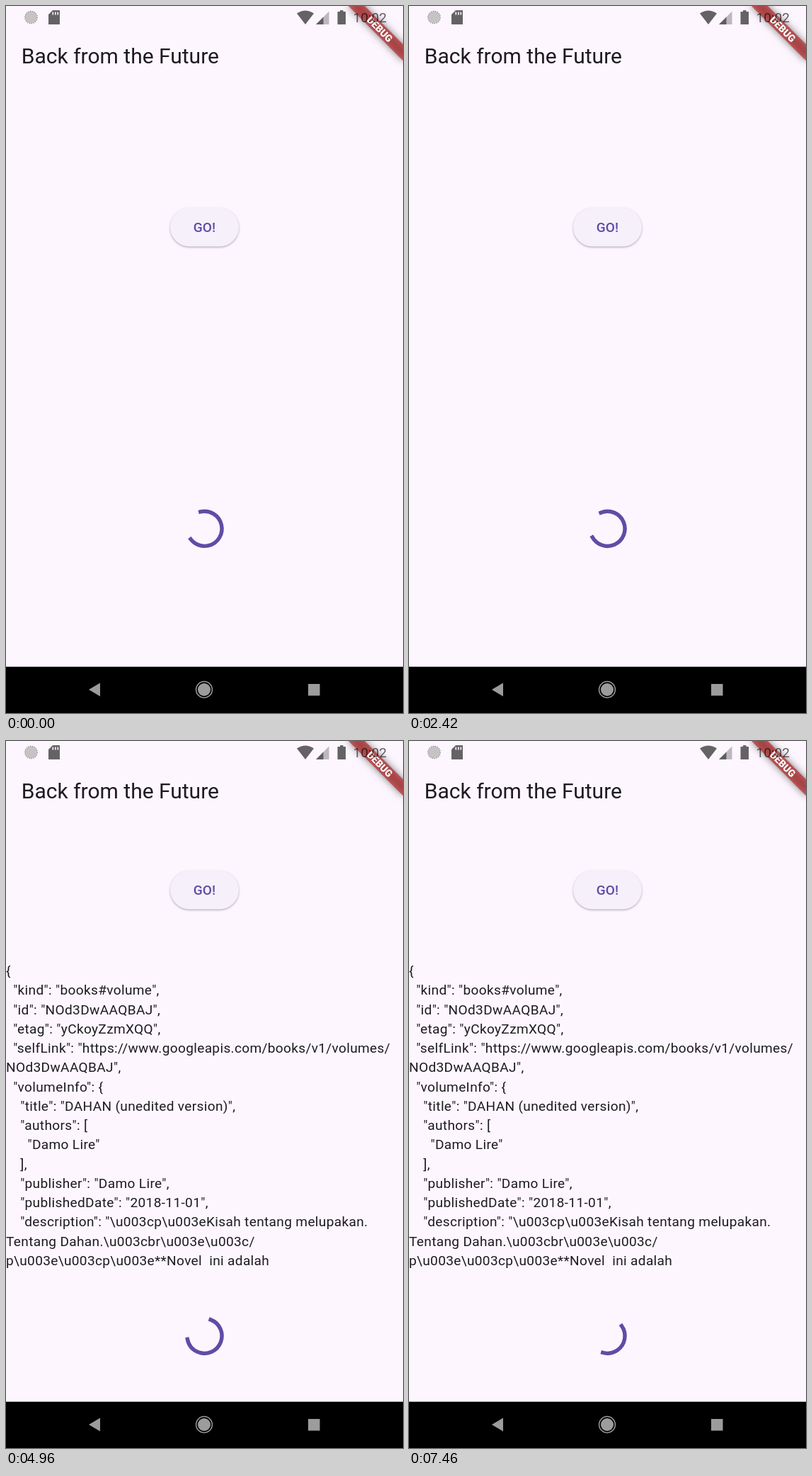
Recreate the animation shown at these times as an HTML page with a canvas. Size 561 by 998 pixels, loop 7.5 s.

```html
<!DOCTYPE html>
<html lang="en">
<head>
<meta charset="utf-8">
<title>Back from the Future</title>
<style>
  html, body { margin: 0; width: 100%; height: 100%; overflow: hidden; background: #fdf6fe; }
  body { position: relative; font-family: Roboto, "Noto Sans", sans-serif; color: #1d1b20; }
  canvas { position: absolute; left: 0; top: 0; display: block; }
  .label { position: absolute; margin: 0; white-space: pre; font-family: inherit; }
  #title { left: 21.8px; top: 51px; font-size: 30px; line-height: 39px; }
  #clock { left: 490.5px; top: 4px; font-size: 19px; line-height: 26px; color: rgba(0, 0, 0, .62); }
  #go { left: 232px; width: 97px; font-size: 19.09px; font-weight: 500; line-height: 27.27px;
        letter-spacing: .14px; text-align: center; color: #604ca6; }
  #json { left: 0; top: 311px; font-size: 19.09px; line-height: 27.27px; letter-spacing: .34px; }
</style>
</head>
<body>
<canvas id="stage" width="561" height="998"></canvas>
<div class="label" id="title">Back from the Future</div>
<div class="label" id="clock">10:02</div>
<div class="label" id="go">GO!</div>
<pre class="label" id="json"></pre>
<script>
const W = 561, H = 998, LOOP = 7500, FPS = 24;
const S = 1.3636;               // device pixels per logical pixel
const RESPONSE = 3700;          // when the answer appears
const PRIMARY = '#604ca6', ICON = 'rgba(0,0,0,.6)', BG = '#fdf6fe';
const ctx = document.getElementById('stage').getContext('2d');
const goLabel = document.getElementById('go');
const json = document.getElementById('json');

json.textContent = String.raw`{
  "kind": "books#volume",
  "id": "NOd3DwAAQBAJ",
  "etag": "yCkoyZzmXQQ",
  "selfLink": "https://www.googleapis.com/books/v1/volumes/
NOd3DwAAQBAJ",
  "volumeInfo": {
    "title": "DAHAN (unedited version)",
    "authors": [
      "Damo Lire"
    ],
    "publisher": "Damo Lire",
    "publishedDate": "2018-11-01",
    "description": "\u003cp\u003eKisah tentang melupakan.
Tentang Dahan.\u003cbr\u003e\u003c/
p\u003e\u003cp\u003e**Novel  ini adalah`;

const clamp = x => Math.min(1, Math.max(0, x));

function poly(color, ...pts) {
  ctx.fillStyle = color;
  ctx.beginPath();
  for (let i = 0; i < pts.length; i += 2) ctx.lineTo(pts[i], pts[i + 1]);
  ctx.fill();
}

function rect(color, x, y, w, h) {
  ctx.fillStyle = color;
  ctx.fillRect(x, y, w, h);
}

function disc(color, x, y, r) {
  ctx.fillStyle = color;
  ctx.beginPath();
  ctx.arc(x, y, r, 0, 2 * Math.PI);
  ctx.fill();
}

function ring(color, x, y, r, width) {
  ctx.strokeStyle = color;
  ctx.lineWidth = width;
  ctx.beginPath();
  ctx.arc(x, y, r, 0, 2 * Math.PI);
  ctx.stroke();
}

// cubic-bezier(.4, 0, .2, 1)
function fastOutSlowIn(x) {
  let lo = 0, hi = 1, s = .5;
  for (let i = 0; i < 24; i++) {
    s = (lo + hi) / 2;
    const bx = 1.2 * (1 - s) ** 2 * s + .6 * (1 - s) * s * s + s ** 3;
    if (bx < x) lo = s; else hi = s;
  }
  return s * s * (3 - 2 * s);
}

function spinner(cy, ms) {
  const u = ms / 1333 % 1, turn = ms / 2222 % 1;
  const head = fastOutSlowIn(clamp(u * 2));
  const tail = fastOutSlowIn(clamp(u * 2 - 1));
  const start = Math.PI * (-.5 + 1.5 * tail + 2 * turn + .5 * u);
  const sweep = Math.max(1.5 * Math.PI * (head - tail), .001);
  ctx.strokeStyle = PRIMARY;
  ctx.lineWidth = 4 * S;
  ctx.lineCap = 'square';
  ctx.beginPath();
  ctx.arc(280.5, cy, 18 * S, start, start + sweep);
  ctx.stroke();
  ctx.lineCap = 'butt';
}

function button(cy, press) {
  const h = 40 * S, x = 232, w = 97;
  ctx.save();
  ctx.shadowColor = 'rgba(0,0,0,.3)';
  ctx.shadowBlur = 3;
  ctx.shadowOffsetY = 1.3;
  ctx.fillStyle = '#f5f0fa';
  ctx.beginPath();
  ctx.roundRect(x, cy - h / 2, w, h, h / 2);
  ctx.fill();
  ctx.restore();
  ctx.fillStyle = `rgba(103,80,164,${.05 * press})`;
  ctx.fill();
  goLabel.style.top = cy - 13.6 + 'px';
}

function statusBar() {
  disc('#c6c3c5', 35.5, 16, 8.5);
  ctx.setLineDash([1.5, 1.5]);
  ring('#969396', 35.5, 16, 8.7, 1.4);
  ctx.setLineDash([]);

  poly(ICON, 66, 6, 76, 6, 76, 26, 60, 26, 60, 12);
  for (const x of [65.5, 69, 72.5]) rect(BG, x, 8.5, 1.6, 4);

  ctx.fillStyle = ICON;
  ctx.beginPath();
  ctx.moveTo(423, 26);
  ctx.lineTo(411, 10.5);
  ctx.quadraticCurveTo(423, 2.5, 435, 10.5);
  ctx.fill();

  poly('rgba(0,0,0,.25)', 438, 26, 456.5, 7.5, 456.5, 26);
  poly('rgba(0,0,0,.5)', 438, 26, 448.5, 15.5, 448.5, 26);
  rect(ICON, 468.5, 8, 11.5, 18);
  rect(ICON, 472, 6, 4.5, 2);
}

function banner() {
  const far = 2000;
  ctx.save();
  ctx.translate(W, 0);
  ctx.save();
  ctx.translate(far, 0);
  ctx.rotate(Math.PI / 4);
  ctx.shadowColor = 'rgba(0,0,0,.5)';
  ctx.shadowBlur = 10.8;
  ctx.shadowOffsetX = -far;
  rect('#000', -40 * S, 28 * S, 80 * S, 12 * S);
  ctx.restore();
  ctx.rotate(Math.PI / 4);
  rect('rgba(183,28,28,.627)', -40 * S, 28 * S, 80 * S, 12 * S);
  ctx.fillStyle = '#fff';
  ctx.font = `900 ${10.2 * S}px Roboto, "Noto Sans", sans-serif`;
  ctx.textAlign = 'center';
  ctx.fillText('DEBUG', 0, 34 * S + 4.8);
  ctx.restore();
}

function navBar() {
  const grey = '#9c9c9c';
  rect('#000', 0, 932.7, W, H - 932.7);
  poly(grey, 117, 965, 133, 955.5, 133, 974.5);
  disc(grey, 280, 965, 9);
  ring(grey, 280, 965, 11.4, 1.5);
  rect(grey, 427, 957, 16.5, 16.5);
}

function draw(t) {
  const loaded = t >= RESPONSE, shift = loaded ? 102 : 0;
  // the interface stalls briefly here
  const live = t > 1269 && t < 1480 ? 1269 : t;
  const press = clamp((t - 3150) / 130) * clamp((3650 - t) / 250);
  rect(BG, 0, 0, W, H);
  button(312.2 - shift, press);
  spinner(737.8 + shift, 6111 + live);
  banner();
  statusBar();
  navBar();
  json.style.visibility = loaded ? 'visible' : 'hidden';
}

const origin = performance.now();
function tick() {
  const t = (performance.now() - origin) % LOOP;
  draw(Math.floor((t + 5) * FPS / 1000) % (LOOP * FPS / 1000) * 1000 / FPS);
  requestAnimationFrame(tick);
}
tick();
</script>
</body>
</html>
```
